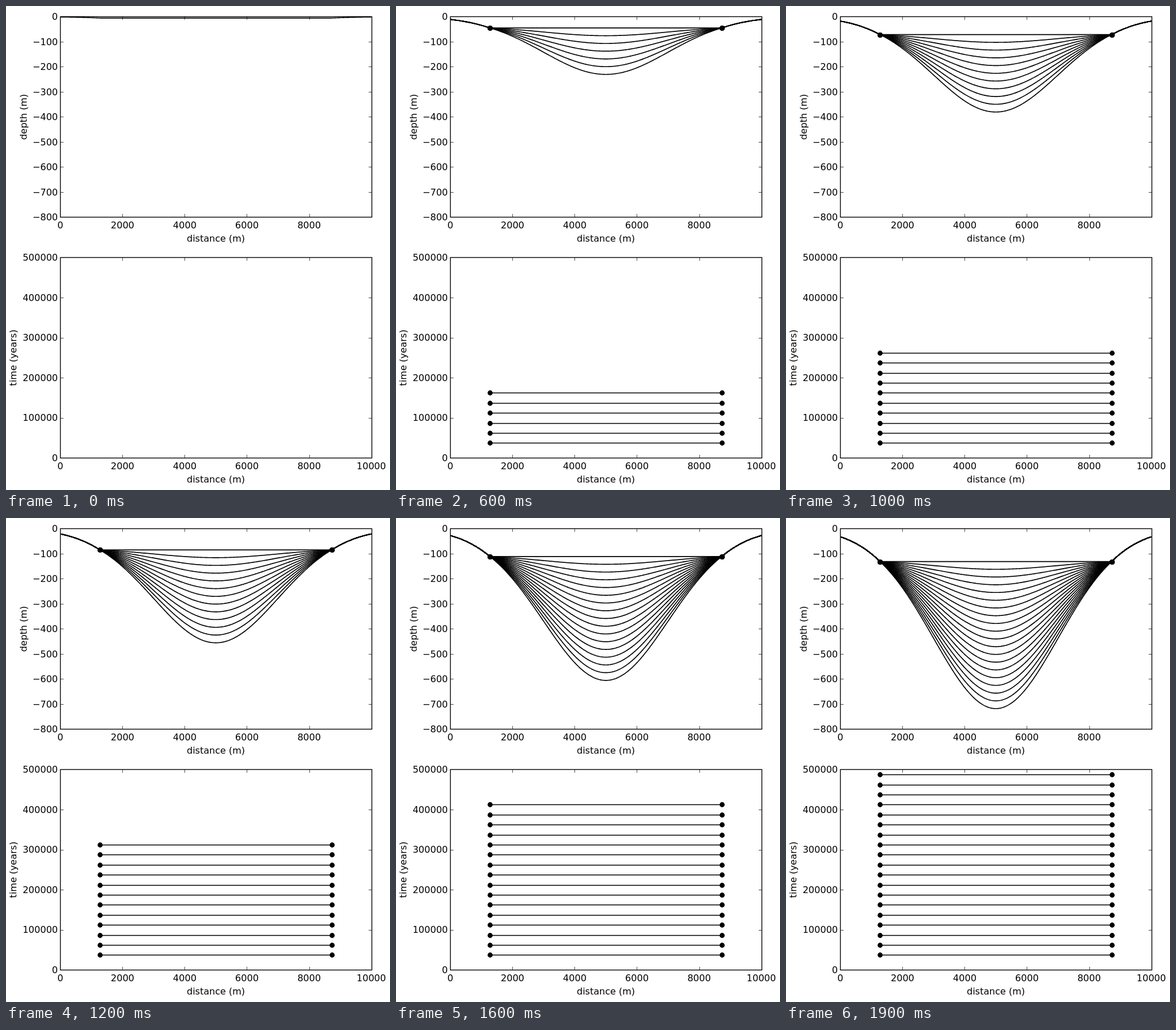
An HTML page that plays this animation: 667x840 px, repeating every 2 s.

```html
<!DOCTYPE html>
<html lang="en">
<head>
<meta charset="utf-8">
<title>Basin subsidence</title>
<style>
  html, body { margin: 0; width: 100%; height: 100%; overflow: hidden; background: #fff; }
  svg { display: block; width: 667px; height: 840px; }
  text { font: 16px "DejaVu Sans", sans-serif; text-anchor: middle; }
  .right { text-anchor: end; }
  .line, .frame { fill: none; stroke: #000; stroke-width: 1.39; }
  .layer { fill: none; stroke: #000; stroke-width: 1.65; }
  .tick { stroke: #000; stroke-width: 0.7; }
</style>
</head>
<body>
<svg id="stage" viewBox="0 0 667 840">
  <defs><clipPath id="clip"><rect x="94" y="18" width="541" height="349"/></clipPath></defs>
  <g id="section" clip-path="url(#clip)"></g>
  <g id="chart"></g>
  <g id="axes"></g>
</svg>
<script>
const LEFT = 94.42, WIDTH = 540.1, HEIGHT = 348;
const DEPTH_TOP = 18.45, TIME_TOP = 436.45;
const STEPS = 20, STEP_MS = 100;
const CENTER = 5000, SIGMA = 2000, EDGE = 1275;
const START_DEPTH = 31.25, DEPTH_PER_STEP = 37.5;

const byId = id => document.getElementById(id);
const section = byId('section'), chart = byId('chart'), axes = byId('axes');

function add(parent, name, attrs, text) {
  const el = document.createElementNS('http://www.w3.org/2000/svg', name);
  for (const key in attrs) el.setAttribute(key, attrs[key]);
  if (text !== undefined) el.textContent = text;
  parent.append(el);
  return el;
}

const px = x => LEFT + x / 10000 * WIDTH;
const depthY = d => DEPTH_TOP + d / 800 * HEIGHT;
const timeY = t => TIME_TOP + (1 - t / 500000) * HEIGHT;
const snap = v => Math.round(v) + 0.5;

const bowl = x => Math.exp(-((x - CENTER) ** 2) / (2 * SIGMA ** 2));
const subsidence = step => START_DEPTH + DEPTH_PER_STEP * step;
const fillLevel = step => subsidence(step) * bowl(EDGE);

// A layer settles flat inside the basin, then sinks with the floor.
function layerPath(layer, step) {
  const points = [];
  for (let x = 0; x <= 10000; x += 25) {
    const deposited = Math.min(subsidence(layer) * bowl(x), fillLevel(layer));
    const depth = deposited + DEPTH_PER_STEP * (step - layer) * bowl(x);
    points.push(px(x).toFixed(2) + ' ' + depthY(depth).toFixed(2));
  }
  return 'M' + points.join('L');
}

function dots(parent, y) {
  for (const x of [EDGE, 10000 - EDGE])
    add(parent, 'circle', { cx: snap(px(x)), cy: snap(y), r: 4.4 });
}

function drawAxes(topEdge, xMax, yLabels, title, titleX) {
  const tick = (x1, y1, x2, y2) => add(axes, 'line', { class: 'tick', x1, y1, x2, y2 });
  const left = snap(LEFT), right = snap(LEFT + WIDTH), size = 5.6;
  const top = snap(topEdge), bottom = snap(topEdge + HEIGHT);
  add(axes, 'rect', { class: 'frame', x: left, y: top, width: right - left, height: bottom - top });
  for (let v = 0; v <= 10000; v += 2000) {
    const x = snap(px(v));
    tick(x, top, x, top + size);
    tick(x, bottom, x, bottom - size);
    if (v <= xMax) add(axes, 'text', { x: px(v), y: bottom + 19.5 }, v);
  }
  yLabels.forEach((label, i) => {
    const exact = topEdge + HEIGHT * i / (yLabels.length - 1);
    const y = snap(exact);
    tick(left, y, left + size, y);
    tick(right, y, right - size, y);
    add(axes, 'text', { class: 'right', x: 90, y: Math.round(exact + 5.6) }, label);
  });
  add(axes, 'text', { x: 364.5, y: bottom + 42.5 }, 'distance (m)');
  add(axes, 'text', { transform: `translate(${titleX} ${(top + bottom) / 2}) rotate(-90)` }, title);
}

const depths = Array.from({ length: 9 }, (_, i) => i ? '\u2212' + i * 100 : '0');
const years = Array.from({ length: 6 }, (_, i) => String((5 - i) * 100000));
drawAxes(DEPTH_TOP, 8000, depths, 'depth (m)', 36);
drawAxes(TIME_TOP, 10000, years, 'time (years)', 18);

function draw(step) {
  section.replaceChildren();
  chart.replaceChildren();
  for (let layer = 0; layer <= step; layer++) {
    add(section, 'path', { class: 'layer', d: layerPath(layer, step) });
    if (!layer) continue;
    dots(section, depthY(fillLevel(step)));
    const y = timeY(12500 + 25000 * layer);
    add(chart, 'path', { class: 'line', d: `M${px(EDGE)} ${snap(y)}H${px(10000 - EDGE)}` });
    dots(chart, y);
  }
}

let shown = 0;
const start = performance.now();
function update(now) {
  const step = Math.floor(Math.max(0, now - start) / STEP_MS) % STEPS;
  if (step !== shown) draw(shown = step);
  requestAnimationFrame(update);
}
draw(0);
requestAnimationFrame(update);
</script>
</body>
</html>
```
